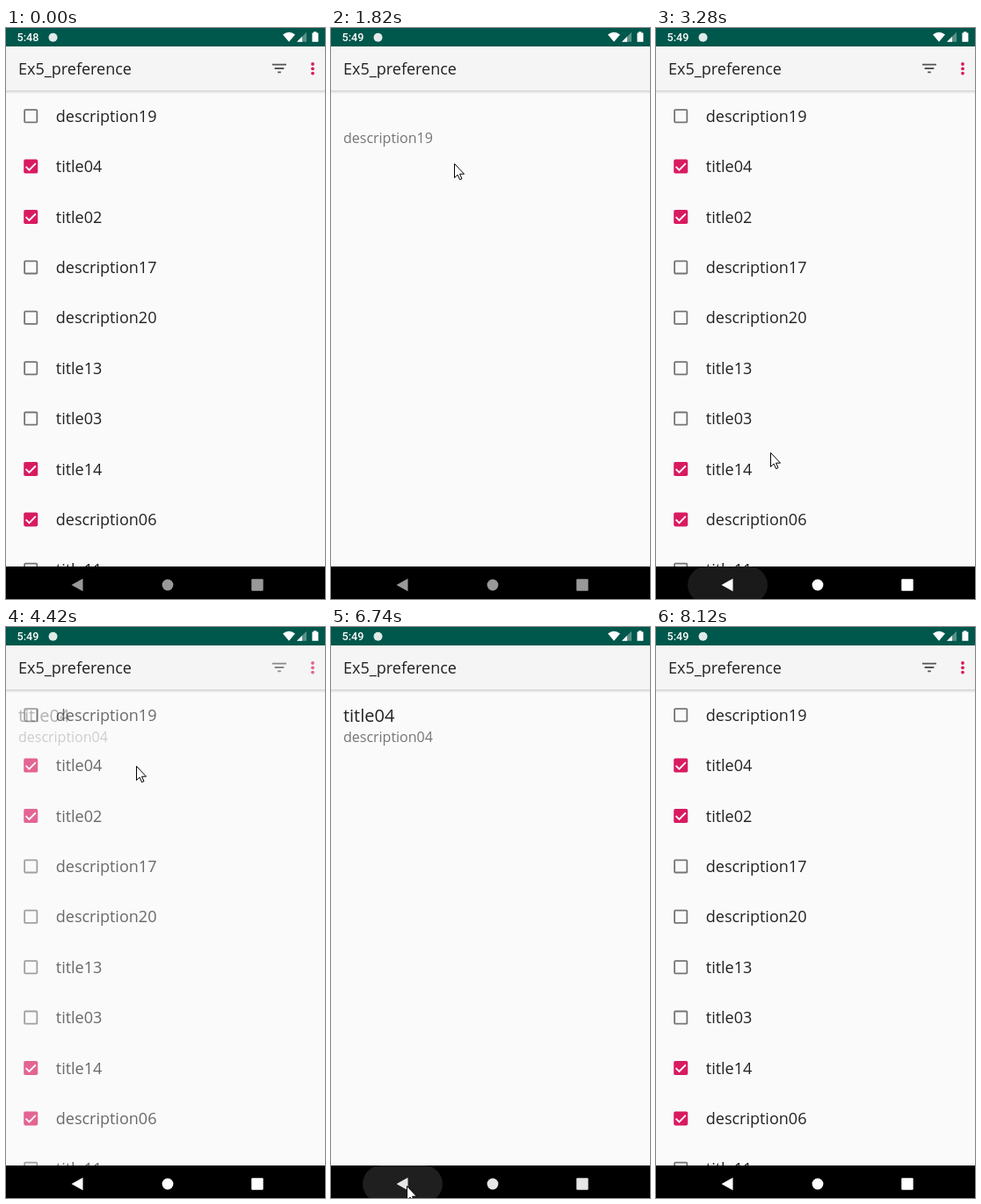
An HTML page that plays this animation: 363 by 650 pixels, repeating every 8900 ms.

```html
<!DOCTYPE html>
<html lang="en">
<head>
<meta charset="utf-8">
<title>Checklist navigation</title>
<style>
  html, body { margin: 0; width: 100%; height: 100%; overflow: hidden; background: #fafafa; }
  svg { display: block; width: 363px; height: 650px; }
  text { font-family: "Open Sans", "Noto Sans", sans-serif; font-size: 18px; fill: #212121; }
  #clock { font: 500 12.6px Roboto, sans-serif; fill: #fff; }
  #heading { font-size: 20px; }
  #description { font-size: 16px; fill: #757575; }
</style>
</head>
<body>
<svg viewBox="0 0 363 650">
  <defs>
    <linearGradient id="shadow" x2="0" y2="1">
      <stop stop-color="#000" stop-opacity=".16"/>
      <stop offset="1" stop-color="#000" stop-opacity="0"/>
    </linearGradient>
  </defs>
  <rect width="363" height="650" fill="#fafafa"/>
  <rect y="21" width="363" height="50" fill="#f5f5f5"/>
  <rect y="71" width="363" height="4" fill="url(#shadow)"/>
  <text x="14" y="53">Ex5_preference</text>

  <g id="list">
    <path d="M303 41.6h16M305.700 46h10.600M309.200 50.400h3.600" stroke="#555" stroke-width="1.8"/>
    <g fill="#d81b60">
      <circle cx="349" cy="41" r="1.900"/><circle cx="349" cy="46.300" r="1.900"/><circle cx="349" cy="51.600" r="1.900"/>
    </g>
    <g id="rows"></g>
  </g>
  <g id="detail">
    <text id="heading" x="14" y="107.500">title04</text>
    <text id="description" x="14" y="131"></text>
  </g>

  <rect width="363" height="21" fill="#00574b"/>
  <text id="clock" x="12.500" y="15.300"></text>
  <circle cx="53.500" cy="10.700" r="5" fill="#e0ebe9"/>
  <g fill="#fff">
    <path d="M315 7.500Q322 2.200 329 7.500L322 15.700Z"/>
    <path d="M331 15.700L342 4.700V15.700Z" opacity=".35"/>
    <path d="M331 15.700L337 9.700V15.700Z"/>
    <path d="M350 4.300h3.400v1.200h2v10.300h-7V5.500h1.600Z"/>
  </g>

  <rect y="613" width="363" height="37"/>
  <rect id="ripple" x="36" y="613" width="91" height="42" rx="21" fill="#1f1f1f"/>
  <g id="buttons">
    <path d="M74.500 634L87.500 626.700V641.300Z"/>
    <circle cx="184" cy="634" r="6.400"/>
    <rect x="279.300" y="627.300" width="13.400" height="13.400" rx="1"/>
  </g>
  <path id="cursor" d="M.5 .5V16.500L4.100 13.100L6.600 18.700L9 17.600L6.500 12.200H11.500Z" fill="#fff" stroke="#000"/>
</svg>
<script>
  const LOOP = 8900, TICK = 77, FIRST_TICK = 178;
  const el = id => document.getElementById(id);

  const items = ["description19", "title04*", "title02*", "description17", "description20",
    "title13", "title03", "title14*", "description06*", "title11"];
  const emptyBox = '<rect x="-7.1" y="-7.1" width="14.2" height="14.2" rx="1" fill="none" stroke="#757575" stroke-width="1.8"/>';
  const checkedBox = '<rect x="-8" y="-8" width="16" height="16" rx="1.8" fill="#d81b60"/>' +
    '<path d="M-5.600 .2L-1.800 4L5.600-3.500" fill="none" stroke="#fff" stroke-width="1.8"/>';
  el("rows").innerHTML = items.map((item, i) =>
    `<g transform="translate(28.2 ${100.200 + i * 57.400})">${item.endsWith("*") ? checkedBox : emptyBox}
     <text x="28.6" y="6.600">${item.replace("*", "")}</text></g>`).join("");

  // Cursor route: tick, x, y
  const route = [
    [0, 288, 624], [4, 200, 300], [9, 116, 98], [20, 116, 98], [24, 210, 320], [26, 224, 430],
    [29, 138, 618], [32, 82, 628], [33, 81, 629], [37, 81, 629], [40, 130, 483], [46, 149, 228],
    [49, 148, 158], [60, 148, 158], [63, 173, 350], [65, 161, 486], [70, 111, 635], [72, 111, 635],
    [75, 86, 636], [87, 86, 636], [93, 137, 446], [97, 157, 239], [99, 157, 239], [102, 326, 624]
  ];

  const ramp = (k, from, to) => Math.min(1, Math.max(0, (k - from) / (to - from)));

  function cursorAt(k) {
    const i = Math.max(1, route.findIndex(p => p[0] >= k));
    const [a, b] = [route[i - 1], route[i]];
    const f = ramp(k, a[0], b[0]);
    return [a[1] + (b[1] - a[1]) * f, a[2] + (b[2] - a[2]) * f];
  }

  function draw(time) {
    const k = Math.floor((time % LOOP - FIRST_TICK) / TICK);
    const secondVisit = k >= 50;

    const detail = ramp(k, 11, 14) - ramp(k, 37, 40) + ramp(k, 54, 57) - ramp(k, 86, 89);
    el("detail").setAttribute("opacity", detail);
    el("list").setAttribute("opacity", 1 - detail);
    el("heading").setAttribute("visibility", secondVisit ? "visible" : "hidden");
    el("description").textContent = secondVisit ? "description04" : "description19";
    el("clock").textContent = k < 4 ? "5:48" : "5:49";

    const light = ramp(k, 35, 38) - ramp(k, 72, 75) + ramp(k, 82, 86);
    const grey = Math.round(153 + 102 * light);
    el("buttons").setAttribute("fill", `rgb(${grey},${grey},${grey})`);
    el("ripple").setAttribute("opacity",
      ramp(k, 34, 37) - ramp(k, 39, 46) + ramp(k, 81, 84) - ramp(k, 86, 93));

    const visible = k >= 0 && k < 103;
    el("cursor").setAttribute("visibility", visible ? "visible" : "hidden");
    if (visible) el("cursor").setAttribute("transform", `translate(${cursorAt(k).map(Math.round)})`);
  }

  const start = performance.now();
  function frame() {
    draw(performance.now() - start);
    requestAnimationFrame(frame);
  }
  frame();
</script>
</body>
</html>
```
